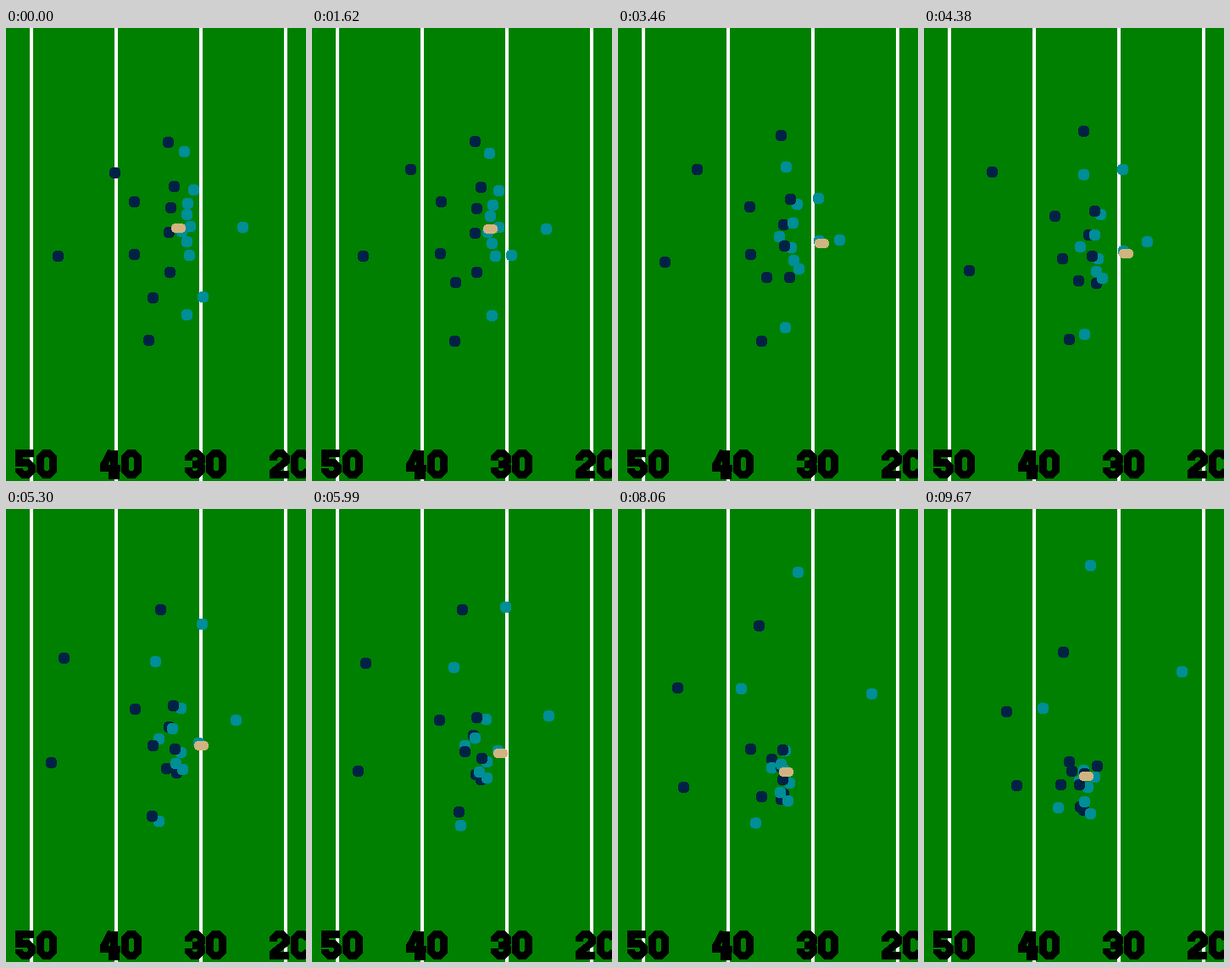
Animation, 354 px wide and 533 px high, one loop 9.9 s. Source, as a matplotlib script:

```python
import numpy as np
import matplotlib.pyplot as plt
from matplotlib.animation import FuncAnimation
from matplotlib.patches import Circle, Ellipse, Rectangle

W, H, DPI = 354, 533, 64
FRAMES, LOOP, SNAP = 43, 9900, 6
GRASS, NAVY, TEAL, TAN = "#008000", "#002244", "#008e97", "#d2b480"

fig = plt.figure(figsize=(W / DPI, H / DPI), dpi=DPI, facecolor=GRASS)
ax = fig.add_axes([0, 0, 1, 1])
ax.set_xlim(0, W)
ax.set_ylim(H, 0)
ax.axis("off")

# Field markings: block digits as chamfered strokes in a 22 x 32 cell
DIGITS = {
    "0": [[(3.5, 13), (3.5, 8), (8, 3.5), (14, 3.5), (18.5, 8), (18.5, 24),
           (14, 28.5), (8, 28.5), (3.5, 24), (3.5, 13)]],
    "2": [[(3.5, 12), (3.5, 8), (8, 3.5), (14, 3.5), (18.5, 8), (18.5, 13),
           (3.5, 25), (3.5, 28.5), (22, 28.5)]],
    "3": [[(3.5, 12), (3.5, 8), (8, 3.5), (14, 3.5), (18.5, 8), (18.5, 12.5),
           (15, 16), (18.5, 19.5), (18.5, 24), (14, 28.5), (8, 28.5),
           (3.5, 24), (3.5, 20)], [(8, 16), (16, 16)]],
    "4": [[(14.5, 0), (14.5, 32)], [(9, 29), (21, 29)],
          [(12, 1), (3.5, 17), (3.5, 21), (22.5, 21)]],
    "5": [[(20.5, 3.5), (3.5, 3.5), (3.5, 14.5), (14, 14.5), (18.5, 19),
           (18.5, 24), (14, 28.5), (8, 28.5), (3.5, 24), (3.5, 21)]],
}


def number(text, x, y=497):
    for ch in text:
        for stroke in DIGITS[ch]:
            px, py = np.array(stroke).T
            ax.plot(px + x, py + y, color="black", lw=7.3 * 72 / DPI,
                    solid_capstyle="butt", solid_joinstyle="miter",
                    aa=False, zorder=1)
        x += 25


for n, yard in enumerate((50, 40, 30, 20)):
    ax.add_patch(Rectangle((28 + 100 * n, 0), 4, H, color="white", lw=0,
                           aa=False, zorder=0))
    number(str(yard), 12 + 100 * n)

movers = []


def add(patch, path):
    patch.set(lw=0, aa=False, snap=False, zorder=2 + len(movers))
    ax.add_patch(patch)
    movers.append((patch, np.round(path) + 0.5))


def run(color, start, end, bow=(0, 0), sway=(0, 0), go=SNAP):
    """Ease from start to end, bent by a half wave (bow) and a full wave (sway)."""
    u = np.clip((np.arange(FRAMES) - go) / (FRAMES - 1 - go), 0, 1)[:, None]
    flow = (u + u * u * (3 - 2 * u)) / 2
    path = (np.array(start) + np.subtract(end, start) * flow
            + np.array(bow) * np.sin(np.pi * u)
            + np.array(sway) * np.sin(2 * np.pi * u))
    add(Circle((0, 0), 6.4, fc=color), path)
    return path


# Defenders drawn underneath
run(NAVY, (194, 211), (174, 308), (7, 0))
run(NAVY, (173, 317), (184, 350), (7, -33), (-10, -6), go=0)

# Backs and receivers
run(TEAL, (210, 145), (140, 234), (-2, -8), (4, 6))
run(TEAL, (221, 190), (188, 307), (1, -10), (-4, 0))
run(TEAL, (213, 219), (183, 320), (-18, 3), (-4, 3))
run(TEAL, (207, 239), (193, 327), (6, 7), (-4, -4))
run(TEAL, (279, 234), (304, 191), (-18, 34), (-10, 0))
run(TEAL, (232, 316), (196, 66), (19, -41), (-2, 2), go=0)
run(TEAL, (213, 337), (158, 351), (-7, 25), (0, -6))
carrier = run(TEAL, (217, 233), (188, 311), (22, 6), (10, -3))

# Defence
run(NAVY, (191, 134), (164, 168), (3, -33), (4, 8))
run(NAVY, (128, 170), (97, 238), (-39, -32), (13, 4), go=0)
run(NAVY, (198, 186), (204, 302), (-5, -8), (7, -3))
run(NAVY, (151, 204), (171, 297), (-10, -11), (7, -5))
run(NAVY, (192, 240), (183, 324), (12, 4), (-3, -4))
run(NAVY, (151, 266), (189, 311), (5, -8), (-6, -3))
run(NAVY, (61, 268), (109, 325), (-32, 5), (7, -8))
run(NAVY, (193, 287), (188, 354), (10, -8), (3, -2))
run(NAVY, (168, 367), (161, 324), (8, 14), (-3, 0))

# Blockers on top
run(TEAL, (214, 206), (201, 315), (-13, 1), (4, 0))
run(TEAL, (213, 251), (189, 344), (-2, 5))
run(TEAL, (216, 267), (196, 358), (1, -3))

# The ball starts at the line and settles into the carrier's hands
caught = np.clip((np.arange(FRAMES) - SNAP + 1) / 8, 0, 1)[:, None]
add(Ellipse((0, 0), 17, 11, fc=TAN),
    carrier + np.array((-14, 2)) * (1 - caught) + np.array((3, 3)) * caught)


def draw(n):
    for patch, path in movers:
        patch.set_center(path[n])
    return [m[0] for m in movers]


anim = FuncAnimation(fig, draw, frames=FRAMES, init_func=lambda: draw(0),
                     interval=LOOP / FRAMES, repeat=True, repeat_delay=0)
plt.show()
```
